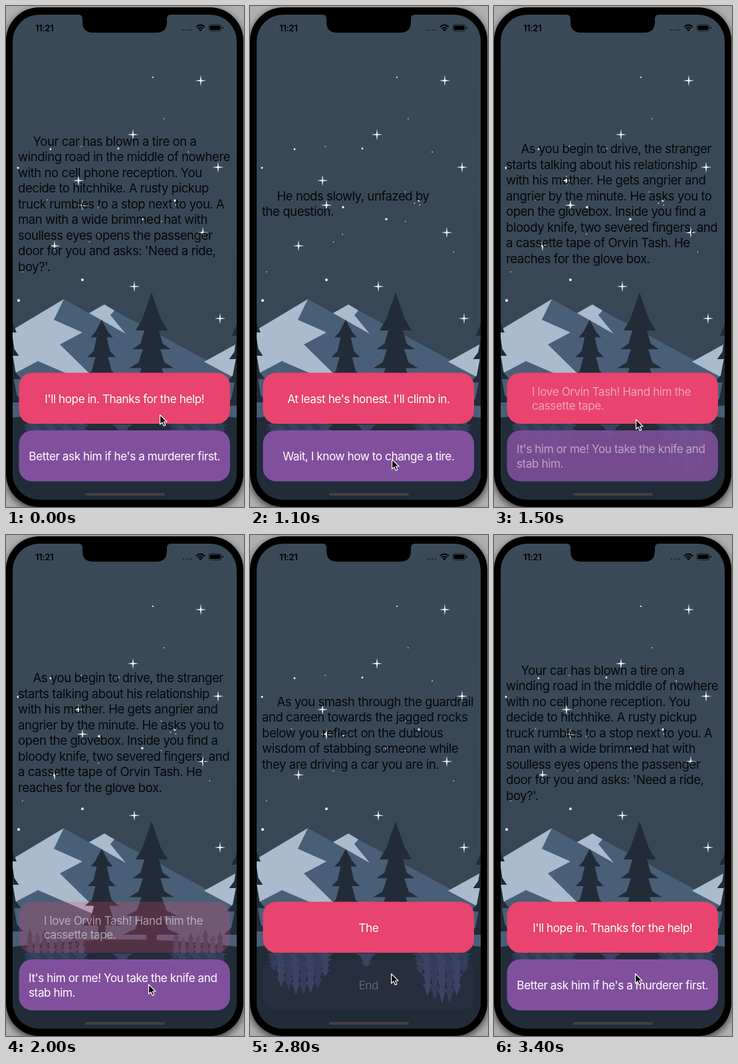
An HTML page for the animation above (3.6 s loop, 358 by 752 pixels).

```html
<!DOCTYPE html>
<html lang="en">
<head>
<meta charset="utf-8">
<title>Story game</title>
<style>
  html, body { margin: 0; width: 100%; height: 100%; overflow: hidden; background: #b0b0b1; }
  svg { display: block; width: 358px; height: 752px; }
  text { font-family: Inter, Roboto, sans-serif; font-optical-sizing: none; letter-spacing: -.026em; white-space: pre; }
  .story { font-size: 18.6px; fill: #050709; }
  .label { font-size: 17.2px; fill: #fff; }
  #body { filter: drop-shadow(0 4px 6px rgba(0, 0, 0, .7)); }
</style>
</head>
<body>
<svg viewBox="0 0 358 752">
  <defs>
    <clipPath id="screen"><rect x="10" y="13" width="337" height="728" rx="40"/></clipPath>
    <linearGradient id="sky" x2="0" y2="1">
      <stop offset="0" stop-color="#3a4a58"/>
      <stop offset=".6" stop-color="#374756"/>
    </linearGradient>
  </defs>
  <rect id="body" x="0" y="2" width="357" height="750" rx="50"/>
  <g clip-path="url(#screen)">
    <rect x="10" y="13" width="337" height="728" fill="url(#sky)"/>
    <g id="stars" fill="#fff"></g>
    <path fill="#495e77" d="M87 440L125 461L148 448L163 457L347 556V632H50V470Z"/>
    <g fill="#a9bbcc">
      <path d="M10 486L87 440L72 471L115 490L81 508L134 560V600H10Z"/>
      <path d="M125 461L148 448L163 457L157 464L180 492L141 470Z"/>
      <path d="M298 534L347 507V560Z"/>
    </g>
    <path fill="#495e77" d="M10 553L48 533L134 570V632H10Z"/>
    <path fill="#212c38" d="M10 618Q178 596 347 618V741H10Z"/>
    <g id="woods"></g>
    <path d="M109 13Q115 13 115 19V24Q115 40 131 40H226Q242 40 242 24V19Q242 13 248 13Z"/>
    <text x="44" y="37.5" font-size="13.2" font-weight="600">11:21</text>
    <path d="M266 36H281" stroke="#1d2731" stroke-width="2" stroke-dasharray="2"/>
    <path d="M286 31.5Q292.5 25.5 299 31.5M288.5 34Q292.500 30.500 296.500 34" fill="none" stroke="#000" stroke-width="2"/>
    <path d="M290 35.5Q292.5 33.5 295 35.5L292.5 38.2Z"/>
    <rect x="305" y="28" width="19" height="9.5" rx="3" fill="none" stroke="#151c23"/>
    <rect x="306.5" y="29.5" width="16" height="6.5" rx="1.7"/>
    <path d="M325.5 31v3.500q1.500-.5 1.500-1.750t-1.500-1.750"/>
    <g id="stories"></g>
    <rect id="pink" x="19.5" y="550.5" width="317.5" height="76.5" rx="20" fill="#e8446f"/>
    <rect id="purple" x="19.5" y="637" width="317.5" height="76.5" rx="20" fill="#80509c"/>
    <g id="topLabels"></g>
    <g id="lowLabels"></g>
    <rect x="119" y="731" width="120" height="4" rx="2" fill="#443f44"/>
  </g>
  <path id="cursor" stroke="#fff" stroke-width="1.2" stroke-linejoin="round"
        d="M.6 .6V15L4 11.9L6.3 17.2L8.8 16.1L6.5 11H11Z"/>
</svg>
<script>
const LOOP = 3600, STEP = 100;
const $ = id => document.getElementById(id);

function add(parent, tag, attrs, text) {
  const el = document.createElementNS('http://www.w3.org/2000/svg', tag);
  for (const k in attrs) el.setAttribute(k, attrs[k]);
  if (text) el.textContent = text;
  return parent.appendChild(el);
}

let seed = 7;
const random = () => (seed = seed * 16807 % 2147483647) / 2147483647;

// Stars: sparkles, clear dots, and a scatter of faint ones
const sparks = [[293,112],[191,193],[109,262],[319,242],[115,299],[296,340],[73,360],[193,421],[322,469]];
const dots = [[221,107],[67,215],[169,214],[18,243],[140,302],[205,320],[254,292],[115,411],[19,442]];
for (const [x, y] of sparks)
  add($('stars'), 'path', { d: `M${x} ${y - 8.5}l1 7.5 7.5 1-7.5 1-1 7.5-1-7.5-7.5-1 7.5-1Z` });
for (const [cx, cy] of dots) add($('stars'), 'circle', { cx, cy, r: .8 + cy / 350 });
for (let i = 0; i < 12; i++)
  add($('stars'), 'circle', { cx: 25 + 305 * random(), cy: 155 + 265 * random(), r: .8 });

// Fir tree with its tip at (x, y); negative h hangs it upside down.
// `first` is the share of the height taken by the top tier.
function tree(x, y, w, h, fill, { tiers = 4, first = .3, foot = y + h } = {}) {
  const side = [];
  let prev = y, inner = 0;
  for (let i = 0; i < tiers; i++) {
    const k = i / (tiers - 1);
    const half = w * (.56 + .44 * k), tip = y + h * (first + (1 - first) * k);
    side.push([inner, prev], [half * .58, prev + (tip - prev) * .7], [half, tip]);
    inner = half * .45;
    prev = tip;
  }
  side.push([w * .18, prev], [w * .18, foot]);
  const at = sign => side.map(([dx, py]) => `${(x + sign * dx).toFixed(1)},${py.toFixed(1)}`);
  add($('woods'), 'polygon', { points: [...at(1), ...at(-1).reverse()].join(' '), fill });
}

// A far grove and its reflection in the lake
function grove(from, to, depth) {
  for (let x = from, i = 0; x <= to; x += 11, i++) {
    const u = 2 * (x - from) / (to - from) - 1;
    const rise = 28 + 14 * random();
    const drop = depth * (.5 + .5 * Math.sqrt(1 - u * u)) - 10 * random();
    tree(x, 632 - rise, 9, rise, i % 2 ? '#3a4d64' : '#32445a');
    tree(x, 628 + drop, 13, -drop, i % 2 ? '#374360' : '#313c56');
  }
}
grove(36, 114, 66);
grove(256, 322, 78);

const DARK = '#212c38';
tree(175, 648, 16, -20, '#374360', { tiers: 2 });
tree(144, 471, 30, 115, DARK, { first: .23, foot: 634 });
tree(219, 430, 43, 170, DARK, { tiers: 5, first: .335, foot: 634 });
tree(3, 445, 23, 150, DARK, { foot: 660 });
tree(354, 450, 26, 150, DARK, { foot: 660 });

// Each scene fades out from `start`, swaps at `cut` and is settled at `end`;
// `fades` is the button that was not chosen.
const scenes = [
  { start: 500, cut: 500, end: 1000, fades: 'pink',
    story: ['He nods slowly, unfazed by', 'the question.'],
    top: ["At least he's honest. I'll climb in."],
    low: ['Wait, I know how to change a tire.'] },
  { start: 1200, cut: 1300, end: 1600, fades: 'purple',
    story: ['As you begin to drive, the stranger', 'starts talking about his relationship',
      'with his mother. He gets angrier and', 'angrier by the minute. He asks you to',
      'open the glovebox. Inside you find a', 'bloody knife, two severed fingers, and',
      'a cassette tape of Orvin Tash. He', 'reaches for the glove box.'],
    top: ['I love Orvin Tash! Hand him the', 'cassette tape.'],
    low: ["It's him or me! You take the knife and", 'stab him.'] },
  { start: 2000, cut: 2100, end: 2500, fades: 'pink',
    story: ['As you smash through the guardrail', 'and careen towards the jagged rocks',
      'below you reflect on the dubious', 'wisdom of stabbing someone while', 'they are driving a car you are in.'],
    top: ['The'],
    low: ['End'] },
  { start: 2600, cut: 2900, end: 3400, fades: 'purple',
    story: ['Your car has blown a tire on a', 'winding road in the middle of nowhere',
      'with no cell phone reception. You', 'decide to hitchhike. A rusty pickup',
      'truck rumbles to a stop next to you. A', 'man with a wide brimmed hat with',
      'soulless eyes opens the passenger', "door for you and asks: 'Need a ride,", "boy?'."],
    top: ["I'll hope in. Thanks for the help!"],
    low: ["Better ask him if he's a murderer first."] }
];

function block(parent, kind, lines, cy, pitch, place) {
  const g = add(parent, 'g', { class: kind });
  lines.forEach((line, i) =>
    add(g, 'text', { y: cy + (i - (lines.length - 1) / 2) * pitch, ...place(i) }, line));
  return g;
}

function label(parent, lines, cy, left) {
  const place = lines.length > 1 ? { x: left } : { x: 178.3, 'text-anchor': 'middle' };
  return block(parent, 'label', lines, cy, 21.5, () => place);
}

for (const s of scenes) s.parts = [
  block($('stories'), 'story', s.story, 303.5, 23.5, i => ({ x: i ? 18 : 40.5 })),
  label($('topLabels'), s.top, 595.5, 57),
  label($('lowLabels'), s.low, 682, 34)
];

const stops = [[0, 231, 613], [100, 228, 686], [600, 226, 625], [1100, 213, 680],
  [1200, 213, 620], [1800, 214, 674], [2100, 214, 628], [2500, 212, 658]];

const clamp = v => Math.max(0, Math.min(1, v));
const fade = (el, v) => el.setAttribute('opacity', v.toFixed(3));

function draw(t) {
  const shown = scenes.findLast(s => t >= s.cut) || scenes[3];
  for (const s of scenes)
    for (const part of s.parts) part.setAttribute('visibility', s === shown ? 'visible' : 'hidden');

  const now = scenes.findLast(s => t >= s.start);
  const button = { pink: 1, purple: 1 }, caption = { pink: 1, purple: 1 };
  if (now && t < now.cut) {
    const left = (now.cut - t) / (now.cut - now.start + STEP);
    button[now.fades] = left ** 2;
    caption[now.fades] = left;
  } else if (now) {
    const age = t - now.cut, span = now.end - now.cut;
    button[now.fades] = clamp(age / span) ** .35;
    caption.pink = caption.purple = clamp((age - STEP) / (span - STEP));
  }
  fade($('pink'), button.pink);
  fade($('purple'), button.purple);
  fade($('topLabels'), caption.pink);
  fade($('lowLabels'), caption.purple);

  const [, x, y] = stops.findLast(p => t >= p[0]);
  $('cursor').setAttribute('transform', `translate(${x} ${y})`);
}

const began = performance.now();
function tick() {
  const t = (performance.now() - began) % LOOP;
  draw(Math.floor(t / STEP) * STEP);
  requestAnimationFrame(tick);
}
draw(0);
requestAnimationFrame(tick);
</script>
</body>
</html>
```
